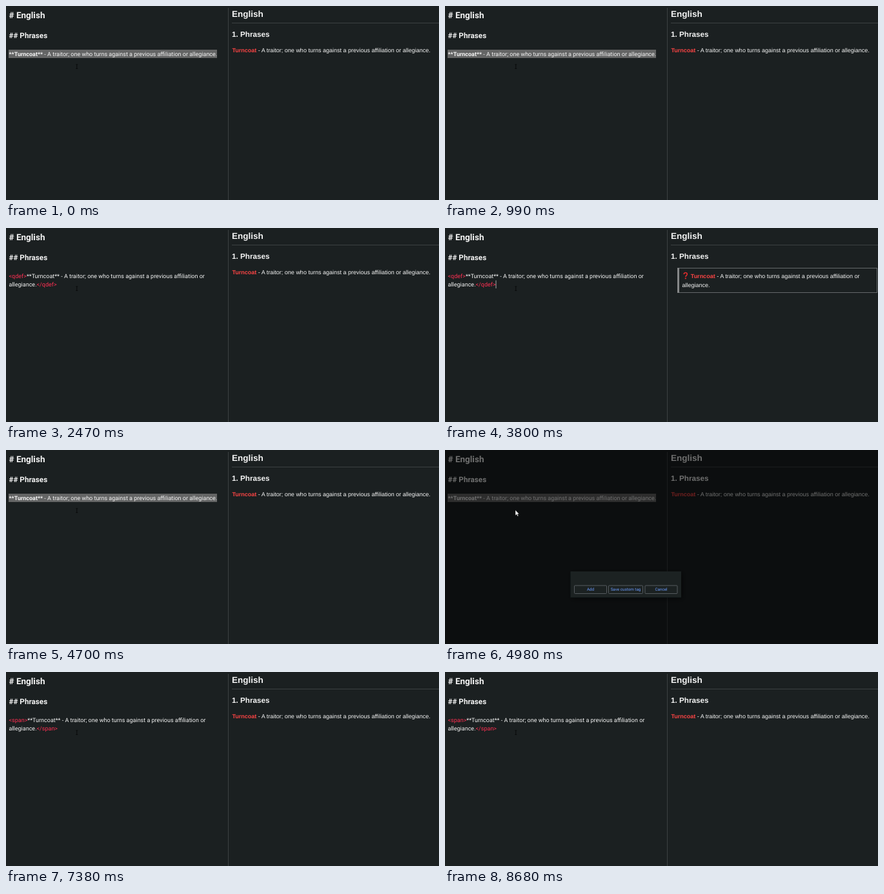
An HTML page for the animation above (8780 ms loop, 671 by 302 pixels).

```html
<!DOCTYPE html>
<html lang="en">
<head>
<meta charset="utf-8">
<title>Quick HTML tags</title>
<style>
  html, body { margin: 0; width: 100%; height: 100%; overflow: hidden; background: #1b2021; }
  svg { display: block; width: 671px; height: 302px; }
  text { white-space: pre; fill: #f4f4f4; font-size: 9px; text-rendering: geometricPrecision; }
  .editor, .dialog { font-family: Roboto, sans-serif; }
  .preview { font-family: "Liberation Sans", Arial, sans-serif; }
  .h1 { font-size: 13.5px; font-weight: 700; }
  .h2 { font-size: 11.7px; font-weight: 700; }
  .strong { font-weight: 700; }
  .tag { fill: #ff2f52; }
  .term { fill: #fa4444; font-weight: 700; }
  .title { font-size: 9.25px; font-weight: 700; }
  .label { font-size: 10.1px; font-weight: 500; }
  .field { font-size: 9.8px; fill: #111; }
  .button rect { fill: none; stroke: #555a5e; }
  .button text { font-size: 6.3px; fill: #6b9cff; text-anchor: middle; }
</style>
</head>
<body>
<svg viewBox="0 0 671 302">
  <defs>
    <filter id="shadow" x="-20%" y="-30%" width="140%" height="170%">
      <feDropShadow dx="2" dy="2" stdDeviation="4" flood-color="#000" flood-opacity=".5"/>
    </filter>
  </defs>
  <rect width="671" height="302" fill="#1b2021"/>
  <path d="M344.5 3V302M350 26.5H671" stroke="#3c4142"/>

  <g class="editor">
    <text class="h1" x="4.5" y="19">&#35; English</text>
    <text class="h2" x="4.5" y="50">&#35;&#35; Phrases</text>
    <g id="selected">
      <rect x="4" y="68" width="323" height="13" fill="#646565"/>
      <text x="4.5" y="78"><tspan class="strong">**Turncoat**</tspan> - A traitor; one who turns against a previous affiliation or allegiance.</text>
    </g>
    <g id="tagged">
      <text x="4.5" y="78"><tspan class="tag" id="openTag"></tspan>**Turncoat** - A traitor; one who turns against a previous affiliation or</text>
      <text x="4.5" y="91">allegiance.<tspan class="tag" id="closeTag"></tspan></text>
      <path id="editorCaret" d="M79 81.5V94" stroke="#ccc" stroke-width=".8"/>
    </g>
  </g>

  <g class="preview">
    <text class="h1" x="350" y="17">English</text>
    <text class="h2" x="350" y="48.3">1. Phrases</text>
    <text id="plain" x="350.5" y="72"><tspan class="term">Turncoat</tspan> - A traitor; one who turns against a previous affiliation or allegiance.</text>
    <g id="definition">
      <rect x="361.5" y="62.5" width="308" height="38" fill="none" stroke="#64686a"/>
      <rect x="360" y="62" width="3" height="39" fill="#858788"/>
      <path d="M370.3 72C370.3 68.6 375.3 68.8 375.2 72C375.1 74 373 74 372.8 76" fill="none" stroke="#e02c2c" stroke-width="1.7"/>
      <circle cx="372.8" cy="78.4" r="1.1" fill="#e02c2c"/>
      <text x="380.8" y="78"><tspan class="term">Turncoat</tspan> - A traitor; one who turns against a previous affiliation or</text>
      <text x="367.5" y="92">allegiance.</text>
    </g>
  </g>

  <path id="ibeam" d="M108.3 91H111.3M109.8 91V97.5M108.3 97.5H111.3" fill="none" stroke="#08090a" stroke-width=".9"/>

  <g id="modal" class="dialog">
    <rect width="671" height="302" fill="#000" fill-opacity=".55"/>
    <rect id="panel" x="194.5" width="171.5" fill="#1b2021" filter="url(#shadow)"/>
    <g id="form">
      <text class="title" x="200.3" y="169">Quick HTML tags</text>
      <text class="label" x="202.5" y="190.5">Choose a tag:</text>
      <rect x="200.5" y="195" width="99.5" height="13" fill="#fff"/>
      <text class="field" x="203" y="205">qdef</text>
      <path d="M293.3 200.3L295.3 202.5L297.3 200.3" fill="none" stroke="#111" stroke-width="1.2"/>
      <text class="label" x="202.5" y="226.5">Enter custom tag:</text>
      <rect x="200.5" y="230.5" width="100" height="15" fill="#fff"/>
      <text class="field" id="typed" x="203" y="241.5"></text>
      <path id="inputCaret" d="M0 233V243" stroke="#111" stroke-width=".8"/>
    </g>
    <g id="buttons">
      <g class="button"><rect x="200.5" y=".5" width="50" height="12.5" rx="1"/><text x="225.5" y="8.7">Add</text></g>
      <g class="button"><rect x="253.5" y=".5" width="53" height="12.5" rx="1"/><text x="280" y="8.7">Save custom tag</text></g>
      <g class="button"><rect x="310" y=".5" width="50" height="12.5" rx="1"/><text x="335" y="8.7">Cancel</text></g>
    </g>
    <path d="M109 93.5V102L111 100.2L112.4 103.2L113.8 102.5L112.4 99.7H115Z" fill="#fff" stroke="#000" stroke-width=".4"/>
  </g>
</svg>

<script>
const LOOP = 8780;
const WORD = "span";
const FIRST_KEY = 6180, KEY_GAP = 200, INPUT_FOCUS = 5680;
const takes = [
  { start: 0, open: 1370, insert: 2370, tag: "qdef", rendered: 3800 },
  { start: 4560, open: 4980, insert: 7280, tag: WORD, rendered: Infinity },
];

const $ = id => document.getElementById(id);
const show = (id, on) => $(id).style.display = on ? "" : "none";
const blink = ms => ms >= 0 && ms % 1060 < 530;

function drawModal(t, take) {
  const full = t >= take.open + 100;
  $("panel").setAttribute("y", full ? 147.5 : 189);
  $("panel").setAttribute("height", full ? 122.5 : 40.5);
  $("buttons").setAttribute("transform", `translate(0 ${full ? 251.5 : 210.5})`);
  show("form", full);

  const keys = Math.max(0, Math.min(WORD.length, Math.floor((t - FIRST_KEY) / KEY_GAP) + 1));
  const lastKey = keys ? FIRST_KEY + (keys - 1) * KEY_GAP : INPUT_FOCUS;
  $("typed").textContent = WORD.slice(0, keys);
  const caretX = 203.3 + (keys ? $("typed").getComputedTextLength() : 0);
  $("inputCaret").setAttribute("transform", `translate(${caretX} 0)`);
  show("inputCaret", blink(t - lastKey));
}

function draw(t) {
  const take = takes[t < takes[1].start ? 0 : 1];
  const tagged = t >= take.insert;
  const modal = t >= take.open && !tagged;
  const rendered = t >= take.rendered;

  show("selected", !tagged);
  show("tagged", tagged);
  $("openTag").textContent = `<${take.tag}>`;
  $("closeTag").textContent = `</${take.tag}>`;
  show("editorCaret", blink(t - take.insert - 350));
  show("plain", !rendered);
  show("definition", rendered);
  show("ibeam", !modal);
  show("modal", modal);
  if (modal) drawModal(t, take);
}

function tick() {
  draw(performance.now() % LOOP);
  requestAnimationFrame(tick);
}
tick();
</script>
</body>
</html>
```
